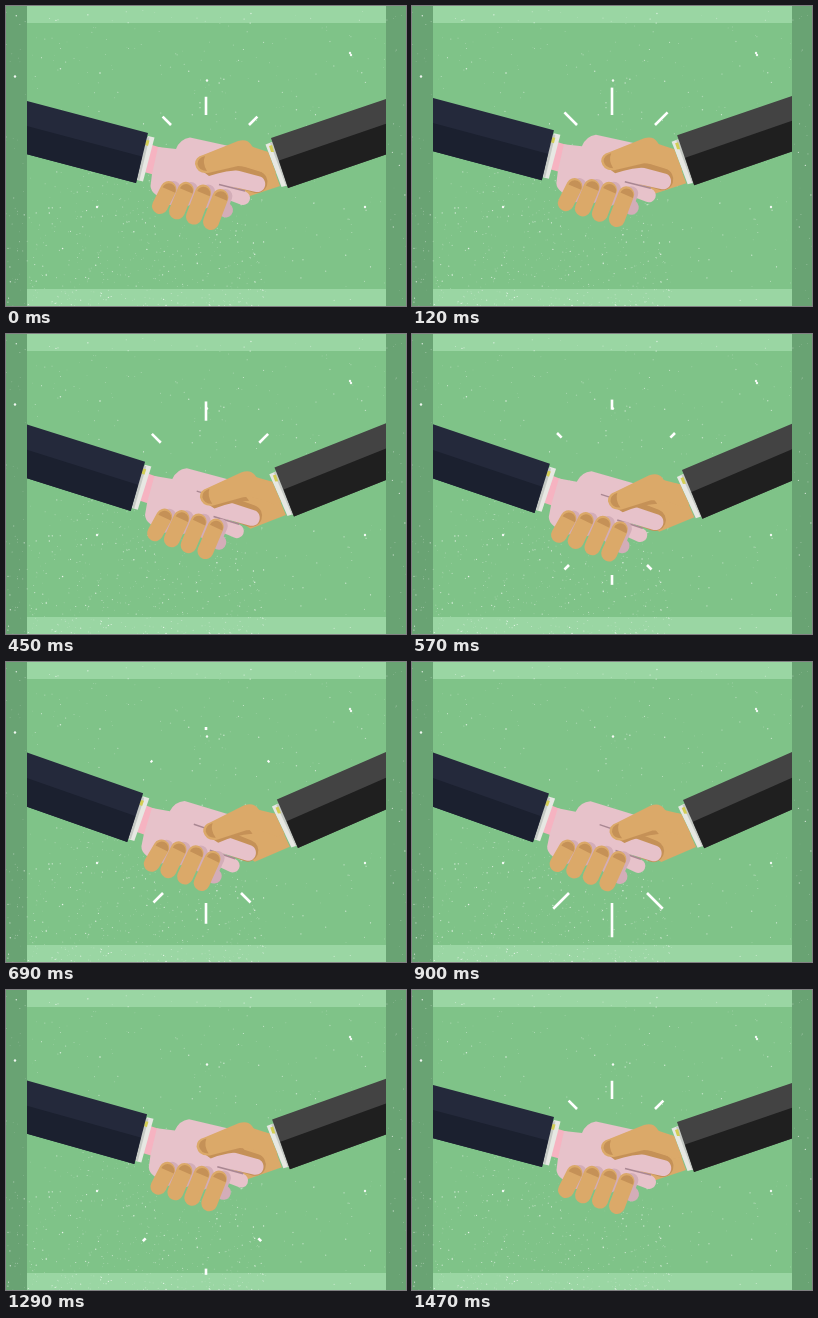
Animation, 400 px wide and 300 px high, one loop 1.5 s. Source, as an HTML page with a canvas:

```html
<!DOCTYPE html>
<html lang="en">
<head>
<meta charset="utf-8">
<title>Handshake</title>
<style>
html, body { margin: 0; width: 100%; height: 100%; overflow: hidden; background: #7fc388; }
canvas { display: block; width: 400px; height: 300px; }
</style>
</head>
<body>
<canvas id="stage" width="400" height="300"></canvas>
<script>
const LOOP = 1500, STEP = 30, CYCLE = 1470;
const ctx = document.getElementById('stage').getContext('2d');

const PINK = '#e7c2ca', PINK_DARK = '#d3adb8', SALMON = '#f6b3c1', CREASE = '#a98792';
const TAN = '#dba969', TAN_DARK = '#c59157';

// Pivot, then shift and turn (degrees) at the full swing
const LEFT = { x: 142, y: 127, dx: -5, dy: 9, turn: 4.7 };
const RIGHT = { x: 265, y: 132, dx: 6, dy: 10.5, turn: -4.9 };
const FINGERS = { x: 183, y: 200, dx: -8.5, dy: 8.5, turn: 3.7 };

const clamp = v => Math.min(1, Math.max(0, v));
const easeInOut = v => (1 - Math.cos(Math.PI * clamp(v))) / 2;
const easeOut = (v, power) => 1 - (1 - clamp(v)) ** power;

// Hands swing down slowly and back up quickly
const swing = t => easeInOut((t - 60) / 705) - easeInOut((t - 1010) / 390);

// Both arms rise, except for a short dip around the start of the cycle
const lift = t => -4.6 * easeInOut(Math.min(t, CYCLE - t) / 200);

function fill(color, d) {
  ctx.fillStyle = color;
  ctx.fill(new Path2D(d));
}

function stroke(color, width, d, cap = 'round') {
  ctx.strokeStyle = color;
  ctx.lineWidth = width;
  ctx.lineCap = cap;
  ctx.stroke(new Path2D(d));
}

function posed(part, t, ...layers) {
  const s = swing(t);
  ctx.save();
  ctx.translate(part.x + part.dx * s, part.y + part.dy * s + lift(t));
  ctx.rotate(part.turn * s * Math.PI / 180);
  ctx.translate(-part.x, -part.y);
  layers.forEach(layer => layer());
  ctx.restore();
}

function rightArm() {
  fill(TAN, 'M262 146L274 180L238 192L215 174L212 154L238 138Z');
  fill('#e7e8e3', 'M259.5 138.5L266 136L283 179L275.5 181Z');
  fill('#c6cac5', 'M264 137L267 136L284 179L280 180Z');
  fill('#d3ce55', 'M263 140L266 139L268 146L265 146Z');
  fill('#434343', 'M265 132L440 72.5V128L282 182Z');
  fill('#1f1f1f', 'M273 154.5L440 97V128L282 182Z');
}

function leftArm() {
  fill(SALMON, 'M146 139L156 142L149 169L138 166Z');
  fill('#e7e8e3', 'M142 130L148.5 131.5L137 175.5L131 174Z');
  fill('#c6cac5', 'M140 131L143.5 131.5L133.5 174L130 173Z');
  fill('#d3ce55', 'M140.5 134L143.5 134.5L142 140L139 139Z');
  fill('#24293b', 'M142 127L-40 79V132L130 177Z');
  fill('#1b202f', 'M136 150.5L-40 104V132L130 177Z');
}

function pinkHand() {
  stroke(TAN_DARK, 22, 'M218 166L250.5 176');
  stroke(PINK_DARK, 15, 'M198 188L219.5 204');
  stroke(PINK, 14, 'M205 180L237 192');
  fill(PINK, 'M152 141L170 143Q174 133 184 131.5L232 142L226 163L254 170.5' +
    'C262 173 261 187 250 186L214 178L206 190L165 195Q145 190 144.5 180L146 168Z');
  stroke(CREASE, 1.6, 'M213 178.5L239 185', 'butt');
  stroke(CREASE, 1.4, 'M195 154L215 159', 'butt');
}

function thumb() {
  fill(TAN_DARK, 'M195 164L203 170Q220 164 238 164L232 155Z');
  fill(TAN, 'M197 149L232 135Q241 132.5 245 138.5Q247 142.5 251 143.5L262 146L270 167L262 169' +
    'Q246 160 232 160L202 167Q191 168 189 158Q189 151 197 149Z');
  fill(TAN_DARK, 'M199 150Q191.5 152 191.5 158Q193 165 201 165Q196 157 199 150Z');
}

function tanFingers() {
  for (let i = 0; i < 4; i++) {
    const x = 162.5 + 17.3 * i, y = 183 + .9 * i * i;
    stroke(PINK_DARK, 14, `M${x + 5} ${y - 1}L${x + 1} ${y + 9}`);
    stroke(TAN, 16, `M${x} ${y}L${154 + 17 * i} ${200 + 5.3 * i}`);
    ctx.fillStyle = TAN_DARK;
    ctx.beginPath();
    ctx.arc(x + .4, y + 1, 6.8, Math.PI + .4, 2 * Math.PI + .4);
    ctx.fill();
  }
}

// Three rays fan out from y, up (dir -1) or down (dir 1)
function rays(y, dir, age) {
  const head = 44 * easeOut(age / 900, 2.4);
  const tail = 44 * easeOut((age - 450) / 530, 1.7);
  if (head - tail < .1) return;
  for (const side of [-1, 0, 1]) {
    const bend = Math.abs(side), pace = bend ? .46 : 1;
    const at = d => `${200 + 39 * side - 4 * dir * bend + side * pace * d} ${y + dir * (pace * d - 10 * bend)}`;
    stroke('#fff', 2.6, `M${at(tail)}L${at(head)}`, 'butt');
  }
}

function makeBackdrop() {
  const sheet = document.createElement('canvas');
  sheet.width = 400;
  sheet.height = 300;
  const c = sheet.getContext('2d');
  const rect = (color, ...box) => { c.fillStyle = color; c.fillRect(...box); };
  rect('#69a373', 0, 0, 400, 300);
  rect('#9ad6a3', 21, 0, 359, 300);
  rect('#7fc388', 21, 17, 359, 266);

  let seed = 11;
  const rnd = () => (seed = seed * 16807 % 2147483647) / 2147483647;
  const dot = (x, y, r, alpha) => {
    c.fillStyle = `rgba(255,255,255,${alpha})`;
    c.beginPath();
    c.arc(x, y, r, 0, 7);
    c.fill();
  };
  // Specks gather towards the lower left
  for (let i = 0; i < 850; i++) {
    const low = i % 2;
    const x = low ? 260 * rnd() : 400 * rnd();
    const y = low ? 300 - 130 * rnd() ** 1.5 : 300 * rnd();
    dot(x, y, .3 + .45 * rnd() ** 2, .25 + .55 * rnd());
  }
  for (const [x, y] of [[201, 74.5], [344, 47], [345, 49], [9, 70.5], [91, 201], [359, 201]])
    dot(x, y, 1.2, .9);
  return sheet;
}

const backdrop = makeBackdrop();

function draw(t) {
  ctx.drawImage(backdrop, 0, 0);
  ctx.save();
  ctx.beginPath();
  ctx.rect(21, 0, 359, 300);
  ctx.clip();
  rays(109, -1, (t + 180) % CYCLE);
  rays(241, 1, (t - 480 + CYCLE) % CYCLE);
  posed(RIGHT, t, rightArm);
  posed(LEFT, t, leftArm, pinkHand);
  posed(RIGHT, t, thumb);
  posed(FINGERS, t, tanFingers);
  ctx.restore();
}

const start = performance.now();
function tick() {
  const t = (performance.now() - start) % LOOP;
  draw(Math.floor(t / STEP) * STEP % CYCLE);
  requestAnimationFrame(tick);
}
tick();
</script>
</body>
</html>
```
